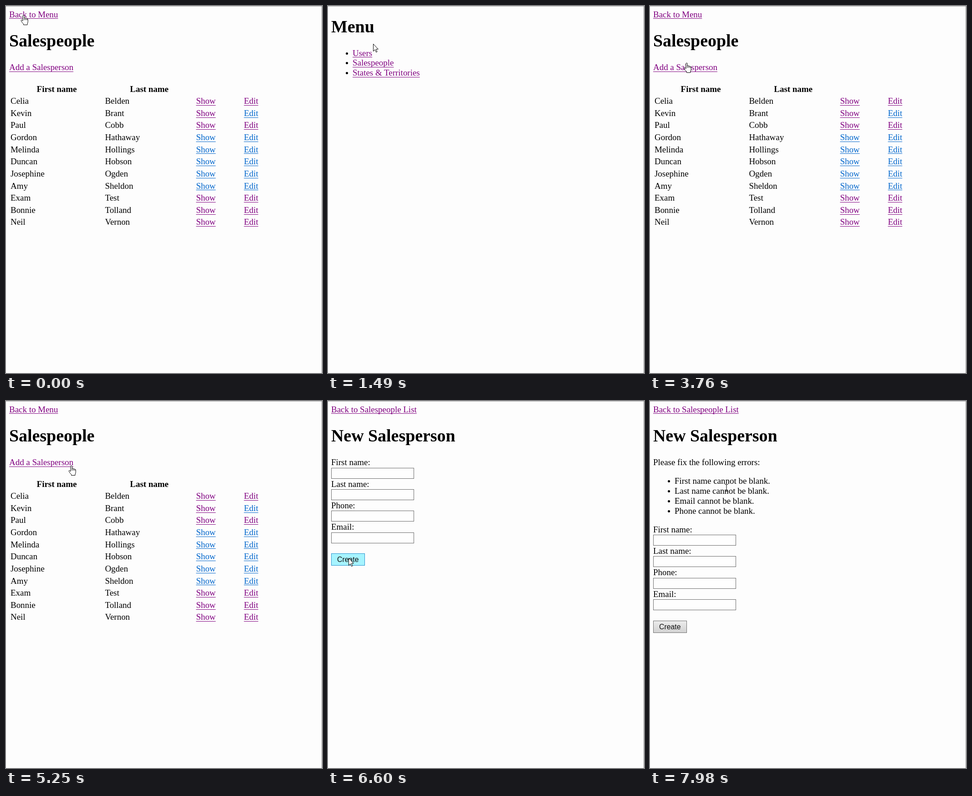
Write an HTML page that moves like this. It is 694 px wide and 807 px high and loops after 8 s.

```html
<!DOCTYPE html>
<html lang="en">
<head>
<meta charset="utf-8">
<title>Salespeople</title>
<style>
html, body { margin: 0; width: 100%; height: 100%; overflow: hidden; background: #fdfdfd; }
#stage { position: absolute; left: 0; top: 0; width: 694px; height: 807px; box-sizing: border-box;
  border: solid #a3a3a3; border-width: 1px 1px 0 0; }
.page, #cursors { position: absolute; left: 0; top: -1px; width: 694px; height: 807px; }
.page { display: none; }
.page.on { display: block; }
.page * { position: absolute; box-sizing: border-box; white-space: pre; }
.text, .bold { font: 18.95px/21px "Liberation Serif", "Times New Roman", serif; color: #000; }
.bold { font-weight: bold; }
.title { font: bold 37.9px/42px "Liberation Serif", "Times New Roman", serif; color: #000; }
.label { font: 15.8px/17px "Liberation Sans", Arial, sans-serif; color: #111; }
.link { text-decoration: underline 1px; text-decoration-skip-ink: none; color: #0066cc; }
.seen { color: #800080; }
.dot { width: 5px; height: 5px; border-radius: 50%; background: #000; }
.field { width: 182px; height: 24px; border: 1px solid #6b6b6b; background: #fefefe; }
.field.hover { border-color: #222; }
.button { width: 74px; height: 27px; border: 1px solid #707070; background: linear-gradient(#ececec, #d2d2d2); }
.button.hover { border-color: #2a94cf; background: #a6f4ff; }
.button.press { border-color: #2a80b8; background: #7fdcf0; }
#cursors path { fill: #fff; stroke: #000; stroke-width: 1; stroke-linejoin: round; }
#cursors #beam { fill: none; }
</style>
</head>
<body>
<div id="stage">
  <div class="page" id="menu"></div>
  <div class="page" id="list"></div>
  <div class="page" id="form"></div>
  <div class="page" id="errors"></div>
  <svg id="cursors">
    <path id="arrow" d="M.5 .5V16.5L4.2 13L6.7 18.6L9 17.6L6.6 12H11.3Z"/>
    <path id="hand" d="M-1.6 13V1.8Q-1.6 .3 0 .3T1.6 1.8V7Q1.6 6 3 6T4.6 7.5Q4.8 6.8 6 7T7.5 8.5Q7.7 8 8.6 8.2T9.6 10V14.5Q9.6 17 8.3 19V21.5H0V19.5Q-3 17 -5.3 12.5Q-5.6 10.5 -4 10.6Q-3 10.8 -1.6 13ZM1.6 7V11M4.6 7.5V11M7.5 8.5V11"/>
    <path id="beam" d="M-3.5 -7.5H-1Q0 -7.5 0 -6.5Q0 -7.5 1 -7.5H3.5M0 -6.5V6.5M-3.5 7.5H-1Q0 7.5 0 6.5Q0 7.5 1 7.5H3.5"/>
  </svg>
</div>
<script>
const $ = id => document.getElementById(id);
const ascent = { text: 17, bold: 17, title: 34, label: 14 };

function add(page, cls, x, y, text = "") {
  const el = document.createElement("div");
  el.className = cls;
  el.style.left = x + "px";
  el.style.top = y + "px";
  el.textContent = text;
  $(page).append(el);
  return el;
}

// y is the text baseline
const write = (page, kind, x, y, text, extra = "") =>
  add(page, kind + " " + extra, x, Math.round(y) - ascent[kind], text);

// the underline snaps to whole pixels apart from the text
function link(page, x, y, text, seen = true) {
  const el = write(page, "text", x, y, text, seen ? "link seen" : "link");
  el.style.textUnderlineOffset = Math.round(y + 2.8) - Math.round(y) + "px";
}
const bullet = (page, y) => add(page, "dot", 38.5, Math.round(y) - 8.5);

write("menu", "title", 7, 58, "Menu");
["Users", "Salespeople", "States & Territories"].forEach((name, i) => {
  const y = 109.6 + 21.8 * i;
  bullet("menu", y);
  link("menu", 54, y, name);
});

link("list", 7, 24.6, "Back to Menu");
write("list", "title", 7, 89, "Salespeople");
link("list", 7, 140.9, "Add a Salesperson");
write("list", "bold", 67.6, 189, "First name");
write("list", "bold", 272.3, 189, "Last name");
const people = ["Celia Belden", "Kevin Brant", "Paul Cobb", "Gordon Hathaway", "Melinda Hollings",
  "Duncan Hobson", "Josephine Ogden", "Amy Sheldon", "Exam Test", "Bonnie Tolland", "Neil Vernon"];
people.forEach((person, i) => {
  const [first, last] = person.split(" "), y = 215.1 + 26.63 * i, seen = i < 3 || i > 7;
  write("list", "text", 10, y, first);
  write("list", "text", 217.4, y, last);
  link("list", 417.4, y, "Show", seen);
  link("list", 522.5, y, "Edit", seen && i != 1);
});

function buildForm(page, dy) {
  link(page, 7, 24.6, "Back to Salespeople List");
  write(page, "title", 7, 89, "New Salesperson");
  const parts = ["First name:", "Last name:", "Phone:", "Email:"].map((name, i) => {
    write(page, "text", 7, 141.2 + 47.3 * i + dy, name);
    return add(page, "field", 7, Math.round(146.6 + 47.3 * i + dy));
  });
  parts.push(add(page, "button", 7, Math.round(335 + dy)));
  write(page, "label", 20, 354 + dy, "Create");
  return parts;
}
const parts = { form: buildForm("form", 0), errors: buildForm("errors", 147.5) };

write("errors", "text", 7, 141, "Please fix the following errors:");
["First name", "Last name", "Email", "Phone"].forEach((name, i) => {
  const y = 182 + 22 * i;
  bullet("errors", y);
  write("errors", "text", 54, y, name + " cannot be blank.");
});

// time, page, cursor, x, y, part under the cursor, its state
const steps = [
  [0, "list", "hand", 38.5, 20],
  [140, "menu"],
  [420, "menu", "arrow", 75, 39],
  [550, "menu", "arrow", 99, 82],
  [1490, "menu", "arrow", 99, 83],
  [2150, "menu", "arrow", 99, 86],
  [2300, "menu", "arrow", 97, 88],
  [2430, "menu", "arrow", 91, 91],
  [2580, "menu", "hand", 91, 94],
  [2710, "menu", "hand", 88, 106],
  [2840, "menu", "hand", 83, 119],
  [2970, "menu", "hand", 80.5, 125],
  [3760, "list", "hand", 80.5, 125],
  [4290, "list", "hand", 77, 127],
  [4420, "list", "arrow", 132, 147],
  [4550, "list", "arrow", 211, 152],
  [4690, "list", "arrow", 348, 182],
  [4820, "list", "hand", 458, 205],
  [4970, "list", "arrow", 300, 172],
  [5100, "list", "arrow", 156, 146],
  [5250, "list", "hand", 143.5, 142],
  [5780, "form"],
  [6190, "form", "arrow", 142, 142],
  [6340, "form", "beam", 136, 158, 0, "hover"],
  [6470, "form", "beam", 84, 256, 2, "hover"],
  [6600, "form", "arrow", 45, 345, 4, "hover"],
  [7150, "form", "arrow", 45, 345, 4, "press"],
  [7280, "errors"],
  [7560, "errors", "beam", 48, 348],
  [7710, "errors", "beam", 76, 359, 1, "hover"],
  [7850, "errors", "beam", 205, 275],
  [7980, "errors", "beam", 168, 191]
];

let shown;
function show(step) {
  const [, page, cursor, x, y, part, state] = step;
  for (const id of ["menu", "list", "form", "errors"]) $(id).classList.toggle("on", id == page);
  for (const id of ["arrow", "hand", "beam"]) {
    $(id).style.display = id == cursor ? "" : "none";
    if (id == cursor) $(id).setAttribute("transform", `translate(${x} ${y})`);
  }
  for (const el of [...parts.form, ...parts.errors]) el.classList.remove("hover", "press");
  if (state) parts[page][part].classList.add(state);
}

function frame(now) {
  const t = now % 8000, step = steps.findLast(s => s[0] <= t);
  if (step != shown) show(shown = step);
  requestAnimationFrame(frame);
}
show(shown = steps[0]);
requestAnimationFrame(frame);
</script>
</body>
</html>
```
